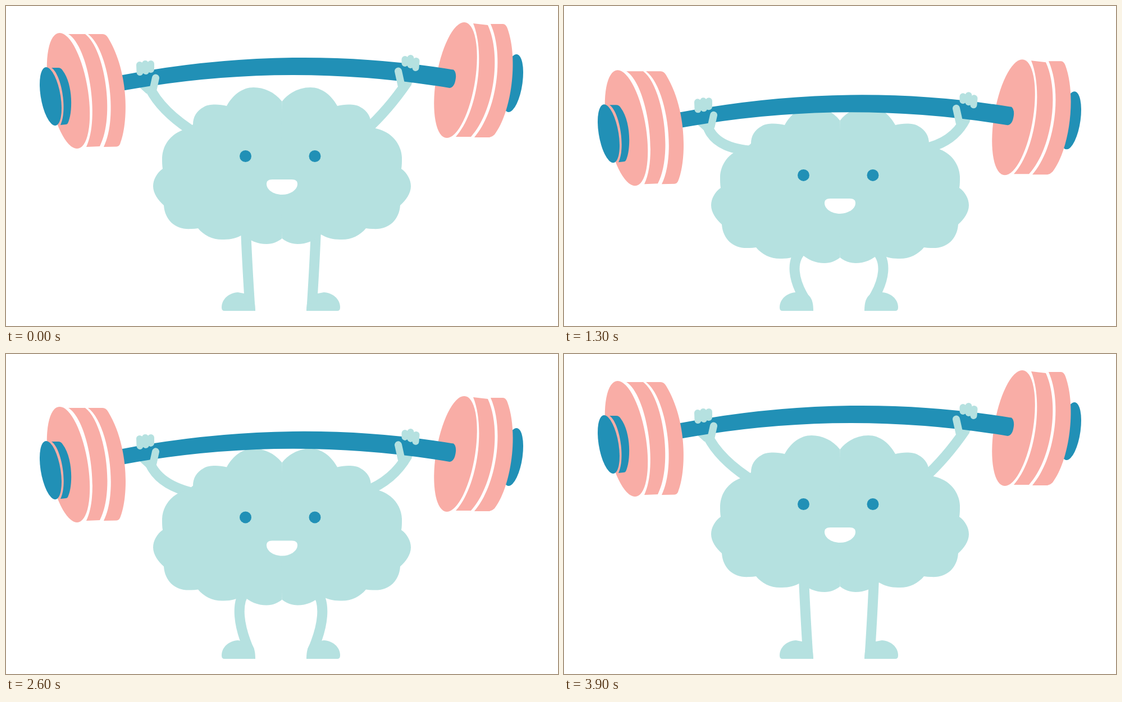
An HTML page for the animation above (4000 ms loop, 983 by 570 pixels).

```html
<!DOCTYPE html>
<html lang="en">
<head>
<meta charset="utf-8">
<title>Brain workout</title>
<style>
  html, body { margin: 0; width: 100%; height: 100%; overflow: hidden; background: #fff; }
  svg { display: block; width: 100%; height: 100%; }
  .pink { fill: #f9ada6; }
  .blue { fill: #2190b6; }
  .mint { fill: #b5e1e0; }
  .limb { fill: none; stroke: #b5e1e0; stroke-width: 18; }
  .finger { stroke-width: 12; stroke-linecap: round; }
  .thumb { stroke-width: 13; stroke-linecap: round; }
</style>
</head>
<body>
<svg viewBox="0 0 983 570">
  <defs>
    <path id="half" d="M491.5 170C478 153 459 145 441 145C421 145 404 158 393 178C380 175 362 174 352 180
      C339 187 333 198 333 211L325 218C296 224 279 246 278 270C278 278 278 284 279 290
      C269 297 262 309 262 321C262 334 271 346 281 355C283 382 302 399 330 397Q336 397 342 396
      C353 409 369 417 388 416C401 416 412 413 422 407C434 418 448 424 464 424C475 424 484 420 491.5 414
      L494 300Z"/>
    <path id="foot" d="M389 543Q384 543 384 537C384 522 397 511 413 510L434 514C441 519 444 528 444 543Z"/>
  </defs>

  <g class="weight">
    <ellipse class="blue" rx="17.7" ry="51.5" transform="matrix(1 0 -.136 1 902 137.5)"/>
    <g class="pink">
      <path d="M863 32C888 88 874 188 834 234L861 234Q866 233 870 229C900 190 913 95 893 40Q890 32 885 32Z"/>
      <path d="M832 31C854 85 840 190 801 233L828 233C869 188 883 88 858 34Z"/>
      <ellipse rx="35" ry="103" transform="matrix(1 0 -.15 1 800.5 132)"/>
    </g>
    <path class="mint" d="M239 140V146L250 156L268 151L270 140ZM697 130L725 133Q723 140 714 148L701 150Z"/>
  </g>

  <path class="limb" id="armL"/>
  <path class="limb" id="armR"/>
  <g class="mint">
    <use href="#foot"/>
    <use href="#foot" transform="matrix(-1 0 0 1 979 0)"/>
  </g>
  <path class="limb" id="leg"/>
  <use href="#leg" transform="matrix(-1 0 0 1 979 0)"/>

  <g id="body">
    <g class="mint">
      <use href="#half"/>
      <use href="#half" transform="matrix(-1 0 0 1 983 0)"/>
    </g>
    <circle class="blue" cx="426.5" cy="267.5" r="10.5"/>
    <circle class="blue" cx="550" cy="267.5" r="10.5"/>
    <path fill="#fff" d="M474 309H509C516 309 519 312 519 317C519 327 507 336 491.5 336C476 336 464 327 464 317C464 312 467 309 474 309Z"/>
  </g>

  <g class="weight">
    <path class="blue" d="M200 124.3L207 123Q505 66.4 793 113L797 113.5Q802 118 801 128Q799 145 790 146Q500 98 212 150L200 152.4Z"/>
    <g class="pink">
      <path d="M146 50C182 76 201 197 174 251L197 250.5Q201 250 203 246C218 210 220 120 182 57Q178 50 172 50Z"/>
      <path d="M111 50C147 72 168 200 143 251L167 250C195 197 176 76 141 50Z"/>
      <ellipse rx="35" ry="103" transform="matrix(1 0 .15 1 111 151)"/>
    </g>
    <g class="blue">
      <path d="M81 110C99 122 110 186 97 212L106 211Q109 211 110 209C119 192 120 140 101 115Q98 110 93 110Z"/>
      <ellipse rx="17.8" ry="52" transform="matrix(1 0 .154 1 79.5 161)"/>
    </g>
    <path class="limb finger" d="M238 105L238.5 118M248 103L249 116M258 103L258 113M710.5 95V102M720.5 93V105M730.5 98L729.5 110"/>
    <path class="limb thumb" d="M266.5 128L262.5 146M698.5 116L704 141"/>
  </g>
</svg>

<script>
const $ = id => document.getElementById(id);
const weights = document.querySelectorAll('.weight');

// Each squat: time of the lowest point, half duration, depth of the bar.
const squats = [[1033, 880, 84], [3016, 872, 85.6]];

function depth(t) {
  const [low, half, size] = squats[t < 2000 ? 0 : 1];
  const u = Math.min(1, Math.abs(t - low) / half);
  return size * (1 + Math.cos(Math.PI * u)) / 2;
}

function draw(t) {
  const bar = depth(t), body = bar * 0.511;
  weights.forEach(g => g.setAttribute('transform', `translate(0 ${bar})`));
  $('body').setAttribute('transform', `translate(0 ${body})`);

  $('armL').setAttribute('d',
    `M254 ${142 + bar}Q${275 - bar * 0.16} ${188 + bar} 340 ${228 + body * 0.9}`);
  $('armR').setAttribute('d',
    `M715 ${135 + bar}Q${680 + bar * 0.2} ${186 + bar * 0.87} 640 ${222 + body * 0.95}`);

  // The knee bows outwards as the hip sinks.
  const hip = 398 + body, len = 530 - hip;
  const thigh = 428 - 0.95 * body + 0.0056 * body * body, shin = 430.5 - 0.72 * body;
  $('leg').setAttribute('d',
    `M427 ${hip}C${thigh} ${hip + len * 0.2} ${shin} ${hip + len * 0.58} 434 530`);
}

const start = performance.now();
function tick() {
  const t = (performance.now() - start) % 4000;
  draw(Math.floor(t / 100) * 100);
  requestAnimationFrame(tick);
}
tick();
</script>
</body>
</html>
```
